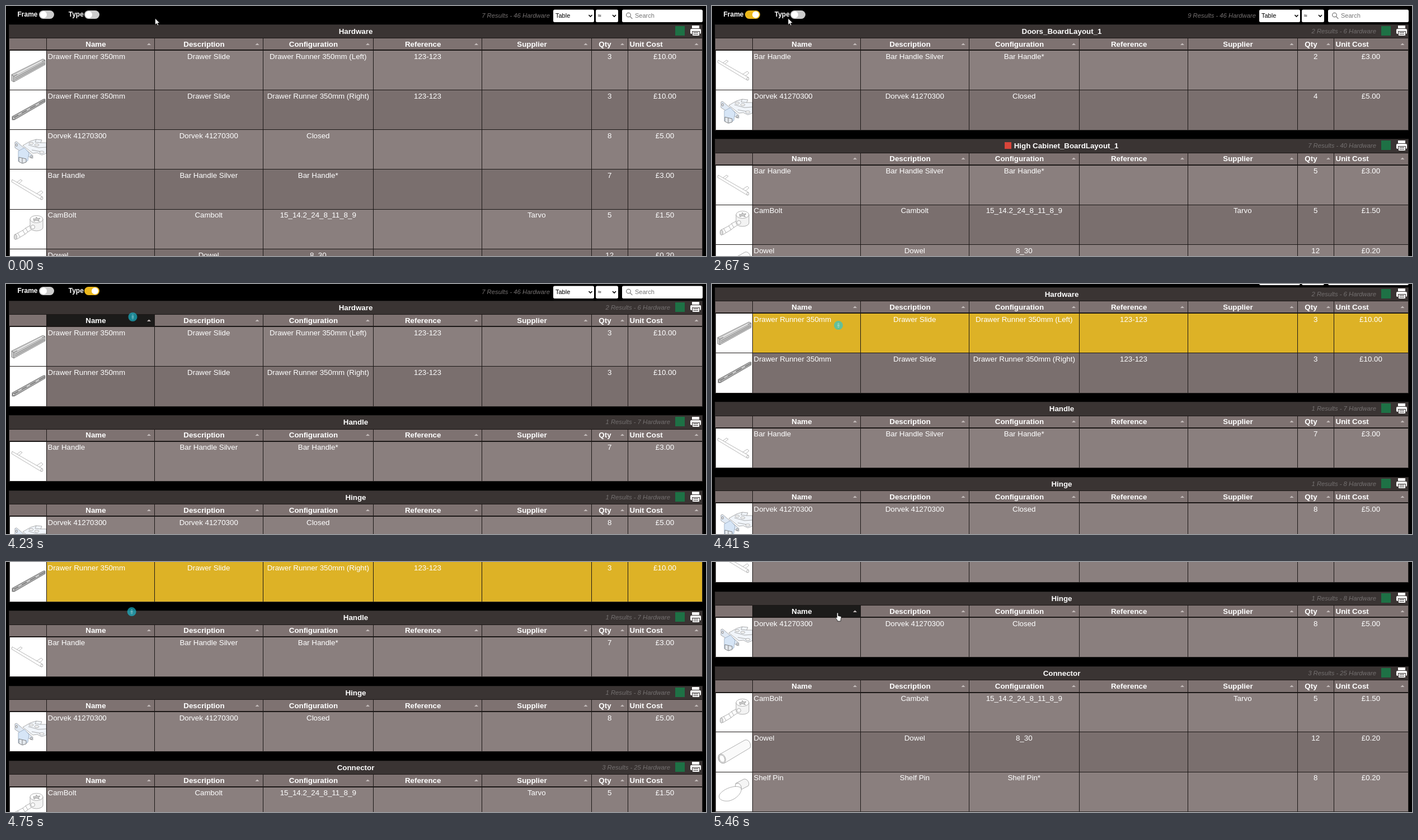
Recreate the animation shown at these times as an HTML page. Size 1251 by 448 pixels, loop 5720 ms.

```html
<!DOCTYPE html>
<html lang="en">
<head>
<meta charset="utf-8">
<title>Hardware list</title>
<style>
  html, body { margin: 0; width: 100%; height: 100%; overflow: hidden; background: #000; }
  svg { display: block; font: 13.33px "Liberation Sans", Arial, sans-serif; fill: #fff; cursor: default; }
  rect { shape-rendering: crispEdges; }
  .round { shape-rendering: auto; }
  .b { font-weight: bold; }
  .m { text-anchor: middle; }
  .count { font-size: 11.3px; font-style: italic; fill: #747070; text-anchor: end; }
  .label { font-size: 12px; font-weight: bold; }
  .field { font-size: 11px; fill: #000; }
  .line { fill: #1b1716; }
  .art { fill: #fff; stroke: #8c8c8c; stroke-width: .7; stroke-linejoin: round; }
</style>
</head>
<body>
<svg id="stage" width="1251" height="448" viewBox="0 0 1251 448">
  <defs>
    <g id="runnerL" class="art">
      <path d="M4 44 60 16 64 18V26L8 57 4 55Z" fill="#ccc" stroke="#666"/>
      <path d="M4 44 8 47 64 18M8 47V57M10 50 62 22M10 53 63 24" fill="none" stroke="#555"/>
      <path d="M14 43 58 20" stroke="#eee" stroke-width="1.500"/>
    </g>
    <g id="runnerR" class="art">
      <path d="M5 48 61 17 64 17V22L9 54 5 54Z" fill="#aaa" stroke="#555"/>
      <path d="M8 50 63 19.500" stroke="#444"/>
      <path d="M16 45 22 41.500M31 37 37 33.500M47 28 53 24.500" stroke="#eee" stroke-width="1.300"/>
      <circle cx="8" cy="51" r="1.800" stroke="#444"/>
    </g>
    <g id="hinge" class="art" stroke="#777">
      <path d="M24 28 38 20 48 17 58 18 56 23 66 23V42L58 45 50 41 42 42Z" fill="#f1f5fa"/>
      <path d="M34 27 52 32 66 31M40 36 56 39M48 17 46 22 56 23" fill="none"/>
      <ellipse cx="39" cy="24" rx="4" ry="1.800"/><ellipse cx="49" cy="27" rx="4" ry="1.800"/>
      <ellipse cx="58" cy="40" rx="4" ry="2"/>
      <path d="M10 22 13 21 42 46V51L38 50 10 32Z" fill="#e0e9f4"/>
      <path d="M16 38 27 32 35 41 33 55 24 60 16 56Z" fill="#d6e5f6" stroke="#8aa0b8"/>
      <path d="M17 49 30 52V58L23 60 17 57ZM23 51V59" fill="#e4e9ee" stroke="#555"/>
      <ellipse cx="13" cy="27" rx="1.400" ry="2.400" stroke="#555"/>
      <ellipse cx="39" cy="48" rx="1.500" ry="2" stroke="#555"/>
    </g>
    <g id="handle" class="art">
      <path d="M12 24 20 18 23 20 15 27ZM48 44 57 38 60 41 52 48Z" stroke="#999"/>
      <path d="M5 18 59 49V53L57 54 4 22Z" stroke="#999"/>
      <ellipse cx="58" cy="51.500" rx="1.800" ry="2.500"/>
    </g>
    <g id="cam" class="art">
      <path d="M9 46 24 38 29 34 38 29 42 35 33 41 28 45 13 54Z"/>
      <path d="M24 38 28 45M29 34 33 41M15 43 19 50" fill="none"/>
      <ellipse cx="11" cy="50" rx="2.500" ry="4.500" fill="#ddd"/>
      <path d="M37 18V33A11.500 6 0 0 0 60 33V18Z" fill="#f3f3f3"/>
      <ellipse cx="48.500" cy="18" rx="11.500" ry="6.500"/>
      <path d="M43 17 47 18 48 14 51 17 55 16 52 20 54 22 48 20 44 22Z" fill="#ccc"/>
      <circle cx="42" cy="32" r="3.500"/>
    </g>
    <g id="dowel" class="art">
      <path d="M7 40 53 14C60 12 65 22 62 28L17 55C7 58 2 46 7 40Z" fill="#fafafa"/>
      <ellipse cx="12" cy="47.500" rx="6" ry="8.500" transform="rotate(-22 12 47.500)"/>
      <ellipse cx="12" cy="47.500" rx="4.500" ry="6.800" transform="rotate(-22 12 47.500)" fill="none"/>
    </g>
    <g id="pin" class="art">
      <path d="M36 21 51 13C57 12 62 20 59 25L44 33Z" fill="#f5f5f5"/>
      <ellipse cx="41" cy="27" rx="5" ry="7" transform="rotate(-25 41 27)"/>
      <path d="M8 40C15 30 35 23 45 28 50 34 40 48 25 52 12 54 3 48 8 40Z"/>
    </g>
    <g id="printer">
      <rect x="1226" y="2" width="13" height="5"/>
      <rect class="round" x="1223" y="8" width="19" height="9" rx="2"/>
      <rect x="1226" y="12" width="13" height="8" stroke="#3a3433"/>
      <path d="M1228.500 14.500H1237M1228.500 17.500H1237" stroke="#3a3433" stroke-width="1.200"/>
    </g>
  </defs>
  <g id="page"></g>
  <g id="cursor">
    <path id="arrow" d="M0 0V11.800L2.700 9.300 4.400 13.300 6.300 12.500 4.600 8.600H8.300Z" stroke="#000" stroke-width=".7"/>
    <path id="hand" d="M-1.300 1.200C-1.300-.4 1.100-.4 1.100 1.200V5.500L4.800 6.300C6 6.600 6.700 7.200 6.500 8.600L5.500 12.500V15H-.4V13.500L-3.300 9.500C-3.700 8.400-2.500 7.600-1.300 9Z" stroke="#000" stroke-width=".7"/>
    <g id="pan">
      <circle r="8" fill="#1ac8de" fill-opacity=".62"/>
      <g fill="none" stroke="#cfeef2" stroke-width=".7">
        <circle r="1.300"/>
        <path d="M-1.500-2.500 0-4 1.500-2.500M-1.500 2.500 0 4 1.500 2.500"/>
      </g>
    </g>
  </g>
</svg>
<script>
const LOOP = 5720, ROW = 71.2, HEAD = 46.2, GAP = 17;
const COLS = [6, 72, 265.5, 459, 656.5, 850.5, 1046, 1111.5, 1244];
const TITLES = ['', 'Name', 'Description', 'Configuration', 'Reference', 'Supplier', 'Qty', 'Unit Cost'];
const $ = id => document.getElementById(id);

// art, name, description, configuration, reference, supplier, cost
const RUNNER = 'Drawer Runner 350mm', HINGE = 'Dorvek 41270300';
const PARTS = {
  left: ['runnerL', RUNNER, 'Drawer Slide', RUNNER + ' (Left)', '123-123', '', '£10.00'],
  right: ['runnerR', RUNNER, 'Drawer Slide', RUNNER + ' (Right)', '123-123', '', '£10.00'],
  hinge: ['hinge', HINGE, HINGE, 'Closed', '', '', '£5.00'],
  bar: ['handle', 'Bar Handle', 'Bar Handle Silver', 'Bar Handle*', '', '', '£3.00'],
  cam: ['cam', 'CamBolt', 'Cambolt', '15_14.2_24_8_11_8_9', '', 'Tarvo', '£1.50'],
  dowel: ['dowel', 'Dowel', 'Dowel', '8_30', '', '', '£0.20'],
  pin: ['pin', 'Shelf Pin', 'Shelf Pin', 'Shelf Pin*', '', '', '£0.20']
};

// title, count, rows as "part quantity", badge
const VIEWS = {
  all: [['Hardware', '', 'left 3,right 3,hinge 8,bar 7,cam 5,dowel 12,pin 8']],
  frame: [
    ['Doors_BoardLayout_1', '2 Results - 6 Hardware', 'bar 2,hinge 4'],
    ['High Cabinet_BoardLayout_1', '7 Results - 40 Hardware', 'bar 5,cam 5,dowel 12,pin 8', true]
  ],
  type: [
    ['Hardware', '2 Results - 6 Hardware', 'left 3,right 3'],
    ['Handle', '1 Results - 7 Hardware', 'bar 7'],
    ['Hinge', '1 Results - 8 Hardware', 'hinge 8'],
    ['Connector', '3 Results - 25 Hardware', 'cam 5,dowel 12,pin 8']
  ]
};

const rect = (x, y, w, h, extra) => `<rect x="${x}" y="${y}" width="${w}" height="${h}" ${extra}/>`;
const text = (x, y, s, cls = '') => s && `<text x="${x}" y="${Math.round(y)}" class="${cls}">${s}</text>`;
const use = (id, x, y) => `<use href="#${id}" x="${x}" y="${Math.round(y)}"/>`;
const mid = i => (COLS[i] + COLS[i + 1]) / 2;

function block(top, [title, count, list, badge]) {
  const rows = list.split(',').map(r => r.split(' '));
  const height = HEAD + rows.length * ROW;
  let s = rect(5, top - .5, 1240, height + 1.5, 'fill="#2b2827"')
    + rect(6, top + .5, 1238, 23.5, 'fill="#3a3433"')
    + text(badge ? 633 : 625, top + 16.7, title, 'b m')
    + text(1187, top + 15.8, count, 'count')
    + rect(1196, top + 2.5, 17, 17, 'fill="#1e7145"')
    + use('printer', 0, top)
    + rect(6, top + 25, 1238, 21, 'fill="#7e7271"')
    + rect(72, top + 25, 193.5, 21, `fill="#1c1b1a" data-hover="${top + 24},${top + HEAD}"`);
  if (badge) s += rect(523, top + 5, 12, 12, 'fill="#d8453a"');
  TITLES.forEach((name, i) => {
    if (!i) return;
    const y = top + 39.8, a = COLS[i + 1] - 10;
    s += i == 7 ? text(1114.5, y, name, 'b') : text(mid(i) - 8.3, y, name, 'b m');
    s += `<path d="M${a - 3.5} ${Math.round(top + 36.7)}h7l-3.500-3.500z" fill="#c4bcbb"/>`;
  });
  rows.forEach(([key, qty], i) => {
    const y = top + HEAD + i * ROW, [art, name, ...rest] = PARTS[key];
    rest.splice(4, 0, qty);
    s += rect(72, y, 1172, ROW, `fill="${i % 2 ? '#7a6f6e' : '#8a7f7e'}"`)
      + rect(72, y, 1172, ROW, `fill="#ddb226" data-hover="${y},${y + ROW}"`)
      + rect(6.5, y, 65.5, ROW, 'fill="#fff"')
      + use(art, 6, y)
      + text(74.5, y + 15.3, name);
    rest.forEach((v, k) => s += text(k == 5 ? 1177.5 : mid(k + 2), y + 15.3, v, 'm'));
    s += rect(6, y - (i ? .5 : 1), 1238, i ? 1 : 2, 'class="line"');
  });
  s += rect(6, top + 24, 1238, 1, 'class="line"');
  COLS.slice(1, -1).forEach(x => s += rect(x - .5, top + 24, 1, height - 24, 'class="line"'));
  return [s, height + GAP];
}

function view(id) {
  let top = 33, s = '';
  for (const b of VIEWS[id]) {
    const [part, step] = block(top, b);
    s += part;
    top += step;
  }
  return `<g id="${id}">${s}</g>`;
}

const toggle = (id, x) => rect(x, 8, 27, 15, `id="${id}Bg" class="round" rx="7.5"`)
  + `<circle id="${id}Knob" cx="${x + 8}" cy="15.500" r="6"/>`;
const chevron = x => `<path d="M${x - 3} 16l3 3 3-3" fill="none" stroke="#000" stroke-width="1.600"/>`;
const box = (x, w) => rect(x, 6.5, w, 22.5, 'class="round" rx="2.5"');

$('page').innerHTML =
  text(20.5, 19, 'Frame', 'label') + toggle('frameSw', 59)
  + text(111.7, 19, 'Type', 'label') + toggle('typeSw', 140)
  + '<text id="total" x="972" y="21" class="count"></text>'
  + box(978, 73) + text(982, 21, 'Table', 'field') + chevron(1044.5)
  + box(1054, 40) + text(1057.5, 21, '≈', 'field') + chevron(1087)
  + box(1101, 144) + '<text x="1124" y="21" class="field" style="fill:#757575">Search</text>'
  + '<g fill="none" stroke="#666" stroke-width="1.100"><circle cx="1112.500" cy="16" r="3.800"/><path d="M1115.300 18.800l4 4"/></g>'
  + Object.keys(VIEWS).map(view).join('');

const hovers = [...document.querySelectorAll('[data-hover]')].map(el => {
  const [y0, y1] = el.dataset.hover.split(',').map(Number);
  return { el, y0, y1, live: !!el.closest('#type') };
});

const smooth = p => p * p * (3 - 2 * p);
const clamp = p => Math.max(0, Math.min(1, p));

function track(keys, t, ease = p => p) {
  let i = 0;
  while (i < keys.length - 2 && t >= keys[i + 1][0]) i++;
  const [t0, ...a] = keys[i], [t1, ...b] = keys[i + 1];
  const p = ease(clamp((t - t0) / (t1 - t0)));
  return a.map((v, k) => v + (b[k] - v) * p);
}

const MOVES = [
  [0, 266.5, 22], [30, 266.5, 22], [590, 132.5, 18], [1040, 68, 19], [1190, 72.5, 17.5],
  [1840, 72.5, 17.5], [1870, 74.5, 17.7], [2040, 74.5, 17.7], [2610, 132, 22],
  [2670, 136, 22], [3060, 151, 20], [3460, 151, 20], [3760, 190, 36], [3940, 190, 36],
  [4160, 226.5, 57], [4230, 226.5, 59], [4570, 225.5, 86.5], [4900, 224, 91], [5100, 224.5, 91]
];
const SCROLL = [
  [4190, 0], [4230, 3], [4330, 12], [4450, 34], [4570, 69], [4680, 115],
  [4790, 170], [4900, 228], [5075, 320]
];
const PAN = [4190, 5460], HOLD = 4590;
const pointer = t => track(MOVES, t, smooth);
const scroll = t => Math.round(track(SCROLL, t)[0]);

function setToggle(id, x, p) {
  const mix = (a, b) => Math.round(a + (b - a) * p);
  $(id + 'Bg').setAttribute('fill', `rgb(${mix(204, 236)},${mix(204, 184)},${mix(204, 28)})`);
  $(id + 'Knob').setAttribute('cx', x + 8 + 11 * p);
}

const show = (el, on) => el.style.display = on ? '' : 'none';
const fade = (t, start) => smooth(clamp((t - start) / 400));

function draw(t) {
  const mode = t < 1220 ? 'all' : t < 3230 ? 'frame' : 'type';
  for (const id in VIEWS) show($(id), id == mode);
  $('total').textContent = (mode == 'frame' ? 9 : 7) + ' Results - 46 Hardware';
  setToggle('frameSw', 59, fade(t, 1220) - fade(t, 3180));
  setToggle('typeSw', 140, fade(t, 3180));
  $('page').setAttribute('transform', `translate(0 ${-scroll(t)})`);

  // While panning, the hover stays on the last row the pointer entered.
  const ht = t > HOLD && t < PAN[1] ? HOLD : t;
  const hy = pointer(ht)[1] + scroll(ht);
  let hit = false;
  for (const h of hovers) {
    const on = h.live && mode == 'type' && hy >= h.y0 && hy < h.y1;
    show(h.el, on);
    hit = hit || on;
  }

  const [x, y] = pointer(t);
  const pan = t >= PAN[0] && t < PAN[1];
  const onToggle = y < 23 && (x >= 59 && x <= 86 || x >= 140 && x <= 167);
  const hand = !pan && (onToggle || hit);
  $('cursor').setAttribute('transform', `translate(${x} ${y})`);
  show($('pan'), pan);
  show($('hand'), hand);
  show($('arrow'), !pan && !hand);
}

const start = performance.now();
function tick() {
  draw((performance.now() - start) % LOOP);
  requestAnimationFrame(tick);
}
tick();
</script>
</body>
</html>
```
